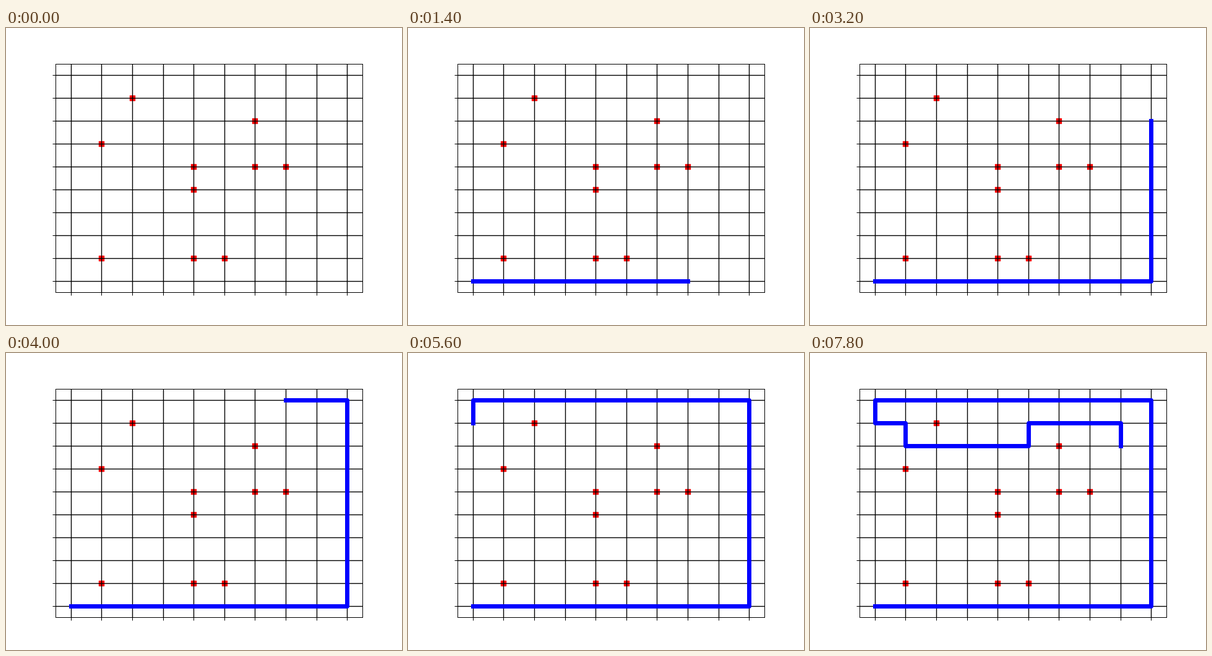
A matplotlib script that plays this animation: 640 by 480 pixels, repeating every 8 s.

```python
import matplotlib.pyplot as plt
from matplotlib.animation import FuncAnimation

SIZE = 10
STEP_MS = 200
FRAMES = 40
DPI = 100
PIXEL = 72 / DPI  # one pixel in points

# Obstacle rows for each column that has any
BLOCKED = {1: (1, 6), 2: (8,), 4: (1, 4, 5), 5: (1,), 6: (5, 7), 7: (5,)}
OBSTACLES = [(x, y) for x, rows in BLOCKED.items() for y in rows]
MOVES = {"right": (1, 0), "up": (0, 1), "left": (-1, 0), "down": (0, -1)}


def is_free(cell, visited):
    inside = all(0 <= c < SIZE for c in cell)
    return inside and cell not in visited and cell not in OBSTACLES


def explore(start, length):
    """Depth-first walk: take the first free move in the order of MOVES."""
    path = [start]
    while len(path) < length:
        x, y = path[-1]
        options = [(x + dx, y + dy) for dx, dy in MOVES.values()]
        path.append(next(cell for cell in options if is_free(cell, path)))
    return path


path = explore((0, 0), FRAMES)

plt.rcParams.update({"axes.linewidth": PIXEL,
                     "xtick.major.width": PIXEL,
                     "ytick.major.width": PIXEL})
fig, ax = plt.subplots(figsize=(640 / DPI, 480 / DPI), dpi=DPI)
ax.set(xlim=(-0.5, SIZE - 0.5), ylim=(-0.5, SIZE - 0.5),
       xticks=range(SIZE), yticks=range(SIZE))
ax.tick_params(labelbottom=False, labelleft=False)
ax.grid(color="black", linewidth=1)
ax.scatter(*zip(*OBSTACLES), marker="s", color="red")
trail, = ax.plot([], [], color="blue", linewidth=5)


def update(i):
    trail.set_data(*zip(*path[:i + 1]))
    return trail,


anim = FuncAnimation(fig, update, frames=FRAMES, interval=STEP_MS,
                     repeat=True, repeat_delay=0)
plt.show()
```
